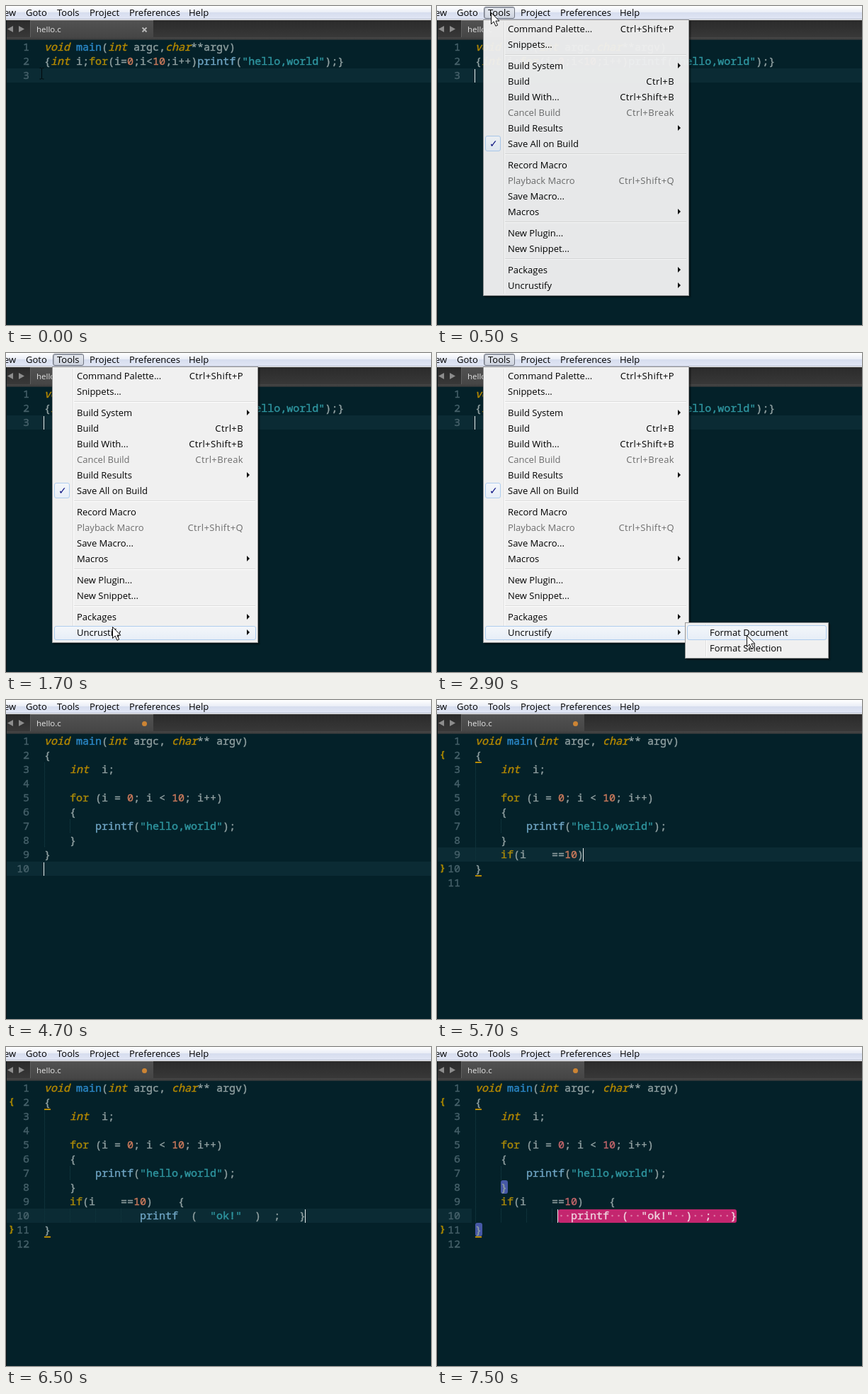
An HTML page for the animation above (8000 ms loop, 600x450 px).

```html
<!DOCTYPE html>
<html lang="en">
<head>
<meta charset="utf-8">
<title>Formatting C code in an editor</title>
<style>
html, body { margin: 0; width: 100%; height: 100%; overflow: hidden; }
#stage { position: relative; width: 600px; height: 450px; overflow: hidden; background: #042129; font: 13px "Open Sans", "Noto Sans", sans-serif; color: #000; }
#stage div, #stage svg { position: absolute; }

/* Timed layers */
.t { visibility: hidden; animation: 8s step-end infinite; }
@keyframes raw { 0% { visibility: visible } 58.75%, 100% { visibility: hidden } }
@keyframes beam { 0% { visibility: visible } 6.25%, 100% { visibility: hidden } }
@keyframes menu { 0% { visibility: hidden } 6.25% { visibility: visible } 58.75%, 100% { visibility: hidden } }
@keyframes fade { 0% { opacity: .965 } 21.25%, 100% { opacity: 1 } }
@keyframes pick { 0% { visibility: hidden } 21.25% { visibility: visible } 58.75%, 100% { visibility: hidden } }
@keyframes sub { 0% { visibility: hidden } 36.25% { visibility: visible } 58.75%, 100% { visibility: hidden } }
@keyframes dirty { 0% { visibility: hidden } 58.75%, 100% { visibility: visible } }
@keyframes neat { 0% { visibility: hidden } 58.75% { visibility: visible } 71.25%, 100% { visibility: hidden } }
@keyframes typing { 0% { visibility: hidden } 71.25% { visibility: visible } 81.25%, 100% { visibility: hidden } }
@keyframes typed { 0% { visibility: hidden } 81.25% { visibility: visible } 93.75%, 100% { visibility: hidden } }
@keyframes select { 0% { visibility: hidden } 93.75%, 100% { visibility: visible } }
@keyframes point {
  0% { transform: translate(76px, 9px) }
  21.25% { transform: translate(150px, 386px) }
  36.25%, 100% { transform: translate(437px, 398px) }
}

/* Window chrome */
#bar { left: 0; top: 0; width: 600px; height: 18px; background: linear-gradient(#fff, #e9edf6 50%, #d6ddee 50%, #e0e5f4); border-bottom: 1px solid #b6bccc; box-shadow: 0 1px #f0f0f0; line-height: 18px; }
#bar div { white-space: pre; }
#open { left: 66px; top: 1px; width: 42px; height: 15px; border: 1px solid #6f7480; border-radius: 3px; background: linear-gradient(#e6e9ef, #cdd3df); box-shadow: inset 1px 1px 1px #a9afbb; }
#strip { left: 0; top: 20px; width: 600px; height: 24px; background: linear-gradient(#2b2b2b, #383838); }
#tab { left: 34px; top: 20px; width: 174px; height: 24px; background: linear-gradient(#525252, #464646); box-shadow: inset 1px 1px #606060; }
#edge { left: 0; top: 44px; width: 600px; height: 4px; background: linear-gradient(#464646, #3e3e3e 70%, #1b2b30); }
#side { left: 0; top: 20px; width: 1px; height: 430px; background: #0c1518; }
#name { left: 43px; top: 24px; font-size: 11.5px; line-height: 18px; color: #e4e4e4; }
#dot { left: 192px; top: 30px; width: 7px; height: 7px; border-radius: 50%; background: #cc8434; }

/* Code */
.page { left: 0; top: 48px; width: 600px; height: 402px; font: 500 15px/20px "Noto Sans Mono", "Liberation Mono", monospace; color: #8f9fa0; -webkit-text-stroke: .4px; }
.num, .code, .hl, .caret, .box, .line, .mark { white-space: pre; height: 20px; }
.num, .code { margin-top: -1px; }
.num { left: 0; width: 33px; text-align: right; color: #46616a; }
.code { left: 54px; }
.hl { left: 1px; background: #0b2b34; }
.guide { width: 1px; background: repeating-linear-gradient(#123840 0 1px, #0a2a32 1px 2px); }
#stage .caret { width: 1px; height: 19px; background: #e6eceb; }
#stage .box { height: 19px; border-radius: 3px; }
#stage .line { left: 54px; width: 9px; height: 2px; background: #b58900; }
.mark { left: 4px; font-size: 13px; font-weight: 700; color: #a58500; }
.code b { font-weight: 500; }
.type { font-style: italic; color: #b58900; }
.key { color: #ab8a08; }
.main { color: #2b88c8; }
.fn { color: #6fa5c4; }
.str { color: #2f96a0; }
.lit { color: #cb7a5c; }
.late .lit { color: #c5666b; }
.sel { color: #f0d5e0; }
.sel u { text-decoration: none; color: #df80ab; }

/* Menus */
.menu { box-sizing: border-box; background: #f0f0f0; border: 1px solid #979797; box-shadow: 2px 2px 2px rgba(0, 0, 0, .45); }
.menu div { white-space: pre; line-height: 22px; height: 22px; }
.menu .groove { width: 1px; background: #e0e0e0; border-right: 1px solid #fff; }
.menu .sep { height: 1px; background: #dcdcdc; border-bottom: 1px solid #fff; }
.menu .hot { height: 20px; box-sizing: border-box; border: 1px solid #afcdee; border-radius: 3px; background: linear-gradient(#f3f6fa, #e7eef7); }
.menu .off { color: #6d6d6d; }
.menu .keys { right: 20px; letter-spacing: .4px; }
.menu .more { width: 0; height: 0; border: 4px solid transparent; border-left-color: #111; border-right: 0; }
</style>
</head>
<body>
<div id="stage">
  <div id="strip"></div>
  <div id="tab"></div>
  <div id="edge"></div>
  <svg width="210" height="48" style="left:0;top:0">
    <path d="M10 28v9l-8-4.5zM18 28v9l8-4.5z" fill="#8d8d8d"/>
    <path class="t" style="animation-name:raw" d="M192.500 30.500l6 6m0-6l-6 6" stroke="#b9b9b9" stroke-width="1.800"/>
  </svg>
  <div id="name">hello.c</div>
  <div id="dot" class="t" style="animation-name:dirty"></div>
  <div id="pages"></div>
  <div id="side"></div>
  <svg class="t" style="animation-name:beam;left:46px;top:87px" width="9" height="17">
    <path d="M1.500 .5h2l1 1 1-1h2M4.500 1v14M1.500 16h2l1-1 1 1h2" fill="none" stroke="#02080b"/>
  </svg>
  <div id="bar"><div id="open" class="t" style="animation-name:menu"></div></div>
  <div id="tools" class="menu t" style="left:65px;top:19px;width:291px;height:390px;animation-name:menu,fade"></div>
  <div id="format" class="menu t" style="left:350px;top:380px;width:203px;height:51px;animation-name:sub"></div>
  <svg class="t" style="animation-name:menu,point;left:0;top:0" width="14" height="21">
    <path d="M.5 .5v16l3.700-3.500 2.700 6.300 2.700-1.200-2.700-6h5z" fill="#fff" stroke="#111"/>
  </svg>
</div>
<script>
const $ = id => document.getElementById(id);

function add(parent, cls, text, style) {
  const el = document.createElement('div');
  el.className = cls;
  el.textContent = text;
  for (const k in style) el.style[k] = typeof style[k] === 'number' ? style[k] + 'px' : style[k];
  parent.appendChild(el);
  return el;
}

// Menu bar
[['View', -14], ['Goto', 28], ['Tools', 72], ['Project', 118], ['Preferences', 174], ['Help', 258]]
  .forEach(([text, left]) => add($('bar'), '', text, { left, top: 0 }));

// Drop-down entries: label|shortcut, "-" separator, ">" submenu, "!" disabled
const entries = `Command Palette...|Ctrl+Shift+P
Snippets...
-
Build System>
Build|Ctrl+B
Build With...|Ctrl+Shift+B
!Cancel Build|Ctrl+Break
Build Results>
Save All on Build
-
Record Macro
!Playback Macro|Ctrl+Shift+Q
Save Macro...
Macros>
-
New Plugin...
New Snippet...
-
Packages>
Uncrustify>`.split('\n');

const tools = $('tools');
add(tools, 'groove', '', { left: 28, top: 2, height: 384 });
add(tools, 'hot t', '', { left: 2, top: 365, width: 285, animationName: 'pick' });
let y = 1;
for (const e of entries) {
  if (e === '-') {
    add(tools, 'sep', '', { left: 30, top: y + 3, width: 256 });
    y += 8;
    continue;
  }
  const off = e[0] === '!' ? ' off' : '';
  const [label, keys] = e.replace(/[!>]/g, '').split('|');
  add(tools, off, label, { left: 34, top: y });
  if (keys) add(tools, 'keys' + off, keys, { top: y });
  if (e.endsWith('>')) add(tools, 'more', '', { left: 274, top: y + 7 });
  if (label.startsWith('Save All')) {
    add(tools, 'hot', '', { left: 2, top: y, width: 22, height: 22 });
    add(tools, '', '✓', { left: 8, top: y, color: '#0c1283', font: '700 14px/22px "DejaVu Sans", sans-serif' });
  }
  y += 22;
}

const format = $('format');
add(format, 'groove', '', { left: 28, top: 2, height: 45 });
add(format, 'hot', '', { left: 2, top: 3, width: 197, height: 21 });
add(format, '', 'Format Document', { left: 34, top: 2 });
add(format, '', 'Format Selection', { left: 34, top: 24 });

// Code pages
const rules = /("[^"]*")|\b(void|int|char)\b|\b(for|if)\b|\b(main)\b|\b(printf)\b|\b(\d+)\b/g;
const kinds = ['str', 'type', 'key', 'main', 'fn', 'lit'];
const paint = s => s.replace(/</g, '\u0001').replace(rules, (m, ...g) =>
  `<b class="${kinds[g.findIndex((x, i) => i < 6 && x)]}">${m}</b>`).replace(/\u0001/g, '&lt;');
const colX = c => 54 + 9 * c;
const rowY = r => (r - 1) * 20;

function page(name, lines, o) {
  const p = add($('pages'), 'page t ' + (o.cls || ''), '', { animationName: name });
  add(p, 'hl', '', { top: rowY(o.row), width: o.sel ? 48 : 599 });
  (o.guides || []).forEach(([col, from, to]) =>
    add(p, 'guide', '', { left: colX(col), top: rowY(from), height: (to - from + 1) * 20 }));
  (o.boxes || []).forEach(([row, col]) =>
    add(p, 'box', '', { left: colX(col), top: rowY(row), width: 10, background: '#4658a6' }));
  if (o.sel) add(p, 'box', '', { left: colX(o.sel), top: rowY(o.row) + 1, width: 9 * (lines[o.row - 1].length - o.sel), background: '#c4266f' });
  lines.forEach((s, i) => {
    add(p, 'num', i + 1, { top: rowY(i + 1) });
    const code = add(p, 'code', '', { top: rowY(i + 1) });
    if (o.sel && i === o.row - 1) {
      code.classList.add('sel');
      code.style.left = colX(o.sel) + 'px';
      code.innerHTML = s.slice(o.sel).replace(/ /g, '<u>·</u>');
    } else code.innerHTML = paint(s);
  });
  (o.pair || []).forEach((row, i) => {
    add(p, 'mark', '{}'[i], { top: rowY(row) - 2 });
    add(p, 'line', '', { top: rowY(row) + 19 });
  });
  const caret = add(p, 'caret', '', { left: colX(o.col) - 1, top: rowY(o.row) + 1 });
  if (o.caret) {
    caret.classList.add('t');
    caret.style.animationName = o.caret;
  }
}

const body = ['void main(int argc, char** argv)', '{', '    int  i;', '',
  '    for (i = 0; i < 10; i++)', '    {', '        printf("hello,world");', '    }'];
const test = '    if(i    ==10)';
const full = [...body, test + '    {', ' '.repeat(15) + 'printf  (  "ok!"  )  ;   }', '}', ''];
const deep = [[0, 3, 10], [4, 7, 7], [4, 10, 10], [8, 10, 10], [12, 10, 10]];

page('raw', ['void main(int argc,char**argv)',
  '{int i;for(i=0;i<10;i++)printf("hello,world");}', ''], { row: 3, col: 0, caret: 'menu' });
page('neat', [...body, '}', ''], { row: 10, col: 0, guides: [[0, 3, 8], [4, 7, 7]] });
page('typing', [...body, test, '}', ''],
  { row: 9, col: test.length, pair: [2, 10], guides: [[0, 3, 9], [4, 7, 7]] });
page('typed', full, { row: 10, col: 41, pair: [2, 11], guides: deep });
page('select', full, { row: 10, col: 13, sel: 13, pair: [2, 11], cls: 'late',
  boxes: [[8, 4], [11, 0]], guides: deep });
</script>
</body>
</html>
```
